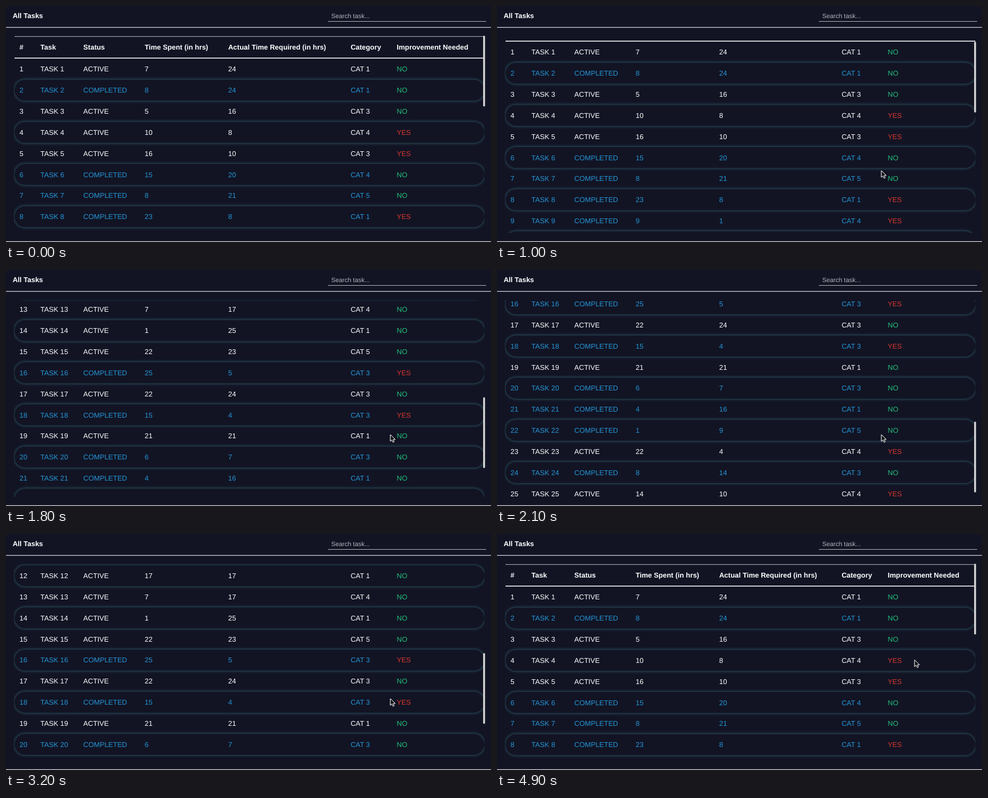
Animation, 800 px wide and 390 px high, one loop 5 s. Source, as an HTML page:

```html
<!DOCTYPE html>
<html lang="en">
<head>
<meta charset="utf-8">
<title>All Tasks</title>
<style>
  html, body { margin: 0; width: 100%; height: 100%; overflow: hidden; background: #121424; }
  svg { display: block; width: 100vw; height: 100vh; }
  text { font-family: "Liberation Sans", Arial, sans-serif; font-size: 11.6px; fill: #fff; text-rendering: geometricPrecision; }
  .bold { font-weight: 700; }
  .hint { font-size: 10.4px; fill: #b4b5bb; }
  .done { fill: #2596d6; }
  .no { fill: #22c07c; }
  .yes { fill: #dc372e; }
</style>
</head>
<body>
<svg id="stage" viewBox="0 0 800 390">
  <defs>
    <clipPath id="view"><rect x="13" y="49.5" width="776" height="325.5"/></clipPath>
    <filter id="glow" filterUnits="userSpaceOnUse" x="0" y="0" width="800" height="1000" color-interpolation-filters="sRGB">
      <feGaussianBlur in="SourceAlpha" stdDeviation="2.8" result="soft"/>
      <feFlood flood-color="#3f7f88" flood-opacity=".8"/>
      <feComposite in2="soft" operator="in"/>
      <feComposite in2="SourceAlpha" operator="out"/>
    </filter>
  </defs>
  <rect width="800" height="390" fill="#121424"/>
  <text class="bold" x="11" y="20">All Tasks</text>
  <text class="hint" x="536.5" y="20">Search task...</text>
  <rect x="531" y="25" width="261" height="1" fill="#a9aab0"/>
  <rect y="34.8" width="800" height="1.1" fill="#dcdde0"/>
  <g clip-path="url(#view)"><g id="table"></g></g>
  <rect id="thumb" x="787" y="49" width="3.2" height="117" rx="1.6" fill="#cfcfd2"/>
  <rect y="388.8" width="800" height="1.2" fill="#d4d5d8"/>
  <path id="pointer" d="M0 0V11.2L2.6 8.8L4.4 12.7L6.3 11.9L4.6 8.1H8Z" fill="#0b0b10" stroke="#fff" stroke-width="1" stroke-linejoin="round"/>
</svg>
<script>
const LOOP = 5000, STEP = 100;
const PITCH = 34.83, FIRST = 104.3;
const COLS = [22.3, 56.8, 127.6, 228.7, 366.5, 568.4, 644.6];
const HEADS = ["#", "Task", "Status", "Time Spent (in hrs)",
  "Actual Time Required (in hrs)", "Category", "Improvement Needed"];

// status, hours spent, hours required, category
const TASKS = `A 7 24 1,C 8 24 1,A 5 16 3,A 10 8 4,A 16 10 3,C 15 20 4,C 8 21 5,
C 23 8 1,C 9 1 4,C 17 22 1,A 16 13 2,A 17 17 1,A 7 17 4,A 1 25 1,A 22 23 5,
C 25 5 3,A 22 24 3,C 15 4 3,A 21 21 1,C 6 7 3,C 4 16 1,C 1 9 5,A 22 4 4,
C 8 14 3,A 14 10 4`.split(",").map(s => s.trim().split(" "));

// time, scroll offset
const SCROLL = [[700, 0], [800, 3], [900, 11], [1000, 28], [1200, 122], [1400, 245.7],
  [1700, 410], [1900, 504], [2100, 570.8], [2300, 587], [2500, 590], [2800, 590],
  [2900, 582], [3000, 552], [3200, 418.4], [3400, 255], [3600, 122], [3800, 34], [4000, 0]];

// time, x, y
const POINTER = [[100, 645, 274], [300, 634, 272], [4600, 634, 272], [4900, 688.8, 208]];

const $ = id => document.getElementById(id);
const table = $("table"), thumb = $("thumb"), pointer = $("pointer");

function add(parent, tag, attrs, content = "") {
  const el = document.createElementNS("http://www.w3.org/2000/svg", tag);
  for (const key in attrs) el.setAttribute(key, attrs[key]);
  el.textContent = content;
  return parent.appendChild(el);
}

function sample(keys, t, k) {
  const next = keys.findIndex(key => key[0] > t);
  if (next === 0) return keys[0][k];
  if (next < 0) return keys[keys.length - 1][k];
  const a = keys[next - 1], b = keys[next];
  return a[k] + (b[k] - a[k]) * (t - a[0]) / (b[0] - a[0]);
}

function build() {
  const pills = add(table, "g", { filter: "url(#glow)" });
  add(table, "rect", { x: 14, y: 49.8, width: 775, height: 1, fill: "#b9babf" });
  add(table, "rect", { x: 14, y: 85.3, width: 775, height: 1.6, fill: "#e6e7e9" });
  HEADS.forEach((head, c) => add(table, "text", { x: COLS[c], y: 72.4, class: "bold" }, head));

  TASKS.forEach(([status, spent, needed, cat], i) => {
    const mid = FIRST + i * PITCH, done = status === "C", late = +spent > +needed;
    if (i % 2) add(pills, "rect", { x: 14, y: mid - PITCH / 2, width: 775, height: PITCH, rx: 17.4 });
    const cells = [i + 1, "TASK " + (i + 1), done ? "COMPLETED" : "ACTIVE",
      spent, needed, "CAT " + cat, late ? "YES" : "NO"];
    cells.forEach((cell, c) => {
      const kind = c === 6 ? (late ? "yes" : "no") : done ? "done" : "";
      add(table, "text", { x: COLS[c], y: mid + 4.1, class: kind }, cell);
    });
  });
}

function draw(t) {
  const y = sample(SCROLL, t, 1);
  table.setAttribute("transform", `translate(0 ${-y})`);
  thumb.setAttribute("y", 49 + y * 0.353);
  pointer.setAttribute("transform", `translate(${sample(POINTER, t, 1)} ${sample(POINTER, t, 2)})`);
  pointer.setAttribute("visibility", t < 100 ? "hidden" : "visible");
}

build();
const start = performance.now();
function tick() {
  const t = (performance.now() - start) % LOOP;
  draw(Math.floor(t / STEP) * STEP);
  requestAnimationFrame(tick);
}
tick();
</script>
</body>
</html>
```
